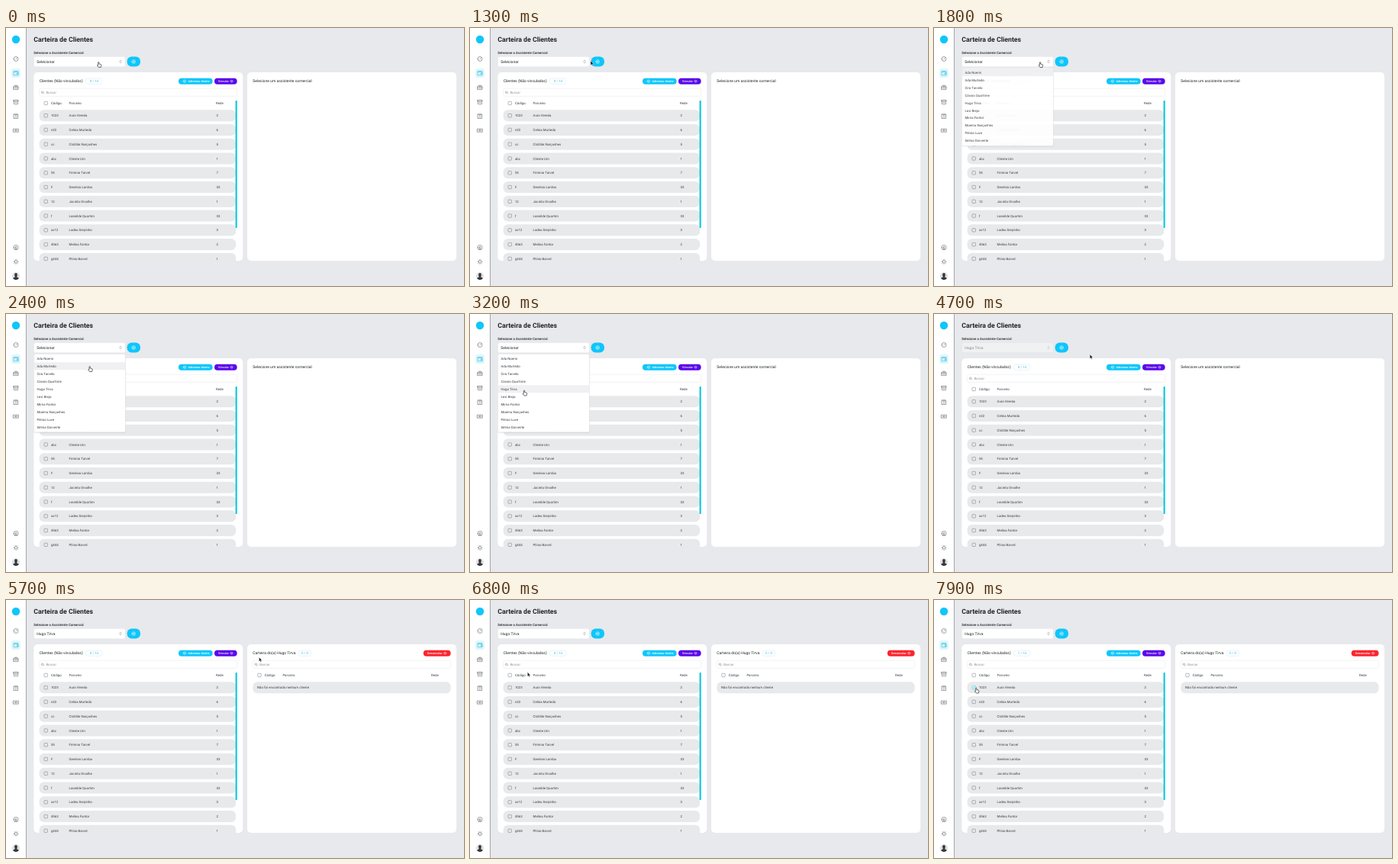
Write an HTML page that moves like this. It is 600 px wide and 338 px high and loops after 8 s.

```html
<!DOCTYPE html>
<html lang="pt">
<head>
<meta charset="utf-8">
<style>
  html, body { margin: 0; width: 100%; height: 100%; overflow: hidden; background: #e8e9ec; }
  svg { display: block; width: 600px; height: 338px; }
  text { font-family: Roboto, Arial, sans-serif; text-rendering: geometricPrecision; white-space: pre; }
</style>
</head>
<body>
<svg id="stage" viewBox="0 0 600 338" xmlns="http://www.w3.org/2000/svg">
  <clipPath id="panelClip"><rect x="36.2" y="58" width="274.3" height="247" rx="5"/></clipPath>
</svg>
<script>
const CYAN = '#0fc6fa', TEAL = '#14c8dc', PURPLE = '#5a08ea', RED = '#fb2530';
const DARK = '#222327', BODY = '#3b3c41', MUTED = '#8e9095', ROW = '#e8e9eb', LINE = '#dfe1e4';
const SMALL = 3.75, MEDIUM = 4.375, LARGE = 5;
const LOOP = 8000, STEP = 100;

const clients = [
  ['1023', 'Auro Vereda', 2], ['n32', 'Celina Murtedo', 6], ['cc', 'Clotilde Narçanhes', 5],
  ['abc', 'Cliente Um', 1], ['55', 'Firmino Tarvel', 7], ['F', 'Genésio Lomba', 33],
  ['12', 'Jacinta Orvalhe', 1], ['f', 'Leonilde Quartim', 33], ['xx12', 'Ladeu Serpinho', 3],
  ['4563', 'Melina Fontor', 2], ['g444', 'Plínio Barvel', 1]
];
const assistants = ['Ada Noemi', 'Ada Murtedo', 'Ciro Tarvelo', 'Cássio Quartime', 'Hugo Tirva',
  'Levi Brejo', 'Mirna Fontor', 'Moema Narçanhes', 'Pérsio Luve', 'Selma Dorvente'];
const chosen = 4;

const stage = document.getElementById('stage');

function el(parent, tag, attrs = {}) {
  const node = document.createElementNS('http://www.w3.org/2000/svg', tag);
  for (const key in attrs) node.setAttribute(key, attrs[key]);
  return parent.appendChild(node);
}
const group = (parent, attrs) => el(parent, 'g', attrs);
const box = (parent, x, y, width, height, fill, rx = 0, stroke = 'none') =>
  el(parent, 'rect', { x, y, width, height, fill, rx, stroke, 'stroke-width': .4 });
const icon = (parent, x, y, d, stroke = '#55575d', width = .55) =>
  el(parent, 'path', { d, fill: 'none', stroke, 'stroke-width': width, 'stroke-linejoin': 'round',
    'stroke-linecap': 'round', transform: `translate(${x} ${y})` });
// The label is centred vertically on y.
function label(parent, x, y, content, size = MEDIUM, fill = BODY, weight = 400) {
  const node = el(parent, 'text', { x, y: y + size * .355, 'font-size': size, fill, 'font-weight': weight });
  node.textContent = content;
  return node;
}
const ring = r => `M${-r} 0a${r} ${r} 0 1 0 ${2 * r} 0a${r} ${r} 0 1 0 ${-2 * r} 0`;
const plus = ring(1.9) + 'M-.9 0H.9M0-.9V.9';
const arrowRing = ring(1.6) + 'M-.7 0H.7M.1-.6L.7 0 .1.6';
const checkbox = (parent, x, y) => box(parent, x - 2.2, y - 2.2, 4.4, 4.4, 'none', .7, '#55575d');

function badge(parent, x, width, content) {
  box(parent, x, 66.1, width, 7.2, '#fff', 2, '#bfe9f0');
  const node = label(parent, x + width / 2, 69.7, content, MEDIUM, '#3fbfd2');
  node.setAttribute('text-anchor', 'middle');
  return node;
}
function button(parent, x, width, fill, caption, textX, iconX, d) {
  box(parent, x, 65.8, width, 7.9, fill, 3.9);
  label(parent, textX, 69.7, caption, SMALL, '#fff', 500);
  icon(parent, iconX, 69.7, d, '#fff', .4);
}
function tableHead(parent, x, networkX) {
  box(parent, x, 79.2, 259.2, 10.2, '#fff', 2.5, LINE);
  icon(parent, x + 4.1, 84.2, ring(1.3) + 'M1 1L1.9 1.9', '#777a80', .5);
  label(parent, x + 8.8, 84.3, 'Buscar', MEDIUM, MUTED);
  checkbox(parent, x + 8.6, 98.5);
  label(parent, x + 15.3, 98.4, 'Código');
  label(parent, x + 39, 98.4, 'Parceiro');
  label(parent, networkX, 98.4, 'Rede');
}

// Sidebar
box(stage, 0, 0, 26, 338, '#fff');
box(stage, 26, 0, 1, 338, '#a3a5a9');
el(stage, 'circle', { cx: 13, cy: 15, r: 5.2, fill: CYAN });
box(stage, 7.2, 53.2, 11.6, 11.8, '#dcf5fb', 2.2);
icon(stage, 13, 40.5, ring(3) + 'M-.4.5L1.5-1.4');
icon(stage, 13, 59.2, 'M2.5-1.7V-2.6H-2.6Q-3.2-2.2-3-1.6V2.6H3V-1.6H-2.7M3-.2H1.2V1.1H3', '#17b7d2');
icon(stage, 13, 78, 'M-3-1.6H3V2.6H-3ZM-1.3-1.6V-2.8H1.3V-1.6M-3 .3H3M0 0V.8');
icon(stage, 13, 97, 'M-3-2.6H3V-1H-3ZM-2.6-1V2.7H2.6V-1M-.9.5H.9');
icon(stage, 13, 115.6, 'M-2.6-2.7H2.6V2.9H-2.6ZM-1.1-2.7V-1.2H1.1V-2.7M-1.1 1H1.1');
icon(stage, 13, 134.2, 'M-3.3-2H3.3V2H-3.3ZM-2.2 0H-1.9M1.9 0H2.2' + ring(.9));
icon(stage, 13, 287.5, ring(3.1) + ring(1) + 'M-1.8 2.4Q0 .4 1.8 2.4');
icon(stage, 13, 306.2, ring(1.8) + 'M0-3.1V-2.6M0 2.6V3.1M-3.1 0H-2.6M2.6 0H3.1M-2.2-2.2L-1.9-1.9M1.9 1.9L2.2 2.2M-2.2 2.2L-1.9 1.9M1.9-1.9L2.2-2.2');
el(stage, 'circle', { cx: 13, cy: 325, r: 5, fill: '#dfe0e2' });
el(stage, 'path', { d: 'M9 328Q9.8 326.6 11.8 326.5L11.6 325.6Q10.3 321.2 13 321.1 15.7 321.2 14.4 325.6L14.2 326.5Q16.2 326.6 17 328 13 332 9 328Z', fill: '#34363b' });

// Header
label(stage, 36.3, 15.2, 'Carteira de Clientes', 8.75, DARK, 700);
label(stage, 36.3, 32.1, 'Selecione o Assistente Comercial', MEDIUM, DARK, 500);
const selectBox = box(stage, 36.4, 37.6, 120, 13.2, '#fff', 2.5, LINE);
const selectValue = group(stage);
const selectText = label(selectValue, 40.3, 44, 'Selecionar', LARGE, DARK);
icon(selectValue, 150, 44, 'M-.9-.7L0-1.7.9-.7M-.9.7L0 1.7.9.7', '#55575d', .5);
box(stage, 158.6, 37.6, 17.4, 13, CYAN, 6);
icon(stage, 167.2, 44.1, ring(2.3) + 'M-1.1 0H1.1M0-1.1V1.1', '#fff', .55);

// Left panel
const left = group(stage, { 'clip-path': 'url(#panelClip)' });
box(left, 36.2, 58, 274.3, 247, '#fff', 5);
label(left, 43.7, 69.7, 'Clientes (Não vinculados)', LARGE, DARK);
const counter = badge(left, 104.8, 21.2, '0 / 14');
button(left, 226, 44.6, CYAN, 'Adicionar cliente', 238.4, 234, plus);
button(left, 273, 29.7, PURPLE, 'Vincular', 278.1, 295.6, arrowRing);
tableHead(left, 43.6, 275.1);
let firstCheck;
clients.forEach(([code, name, network], i) => {
  const y = 114.7 + i * 18.76;
  box(left, 43.6, y - 7.5, 257.6, 15, ROW, 6);
  const check = checkbox(left, 52.2, y);
  firstCheck ??= check;
  label(left, 58.9, y, code);
  label(left, 82.6, y, name);
  label(left, 275.6, y, network);
});
const tick = icon(left, 52.2, 114.7, 'M-1.1 0L-.3.8 1.2-.8', TEAL, .55);
box(left, 300.6, 95, 2.2, 167, TEAL, .8);

// Right panel
box(stage, 316.1, 58, 274, 247, '#fff', 5);
const rightEmpty = group(stage), rightFull = group(stage);
label(rightEmpty, 323.3, 69.5, 'Selecione um assistente comercial', LARGE, DARK);
label(rightFull, 323.3, 69.7, 'Carteira do(a) ' + assistants[chosen], LARGE, DARK);
badge(rightFull, 383.5, 16, '0 / 0');
button(rightFull, 546.8, 35.8, RED, 'Desvincular', 552, 575.2, arrowRing);
tableHead(rightFull, 323.4, 557);
box(rightFull, 323.4, 107.2, 259.2, 15, ROW, 6);
label(rightFull, 329, 114.6, 'Não foi encontrado nenhum cliente');

// Dropdown
const menu = group(stage);
box(menu, 36.2, 53.2, 121, 103, '#000', 2.5).setAttribute('opacity', .06);
box(menu, 36.6, 52.4, 119.8, 102.4, '#fff', 2, '#dcdde0');
const highlight = box(menu, 36.8, 53, 119.4, 10, '#f0f0f2');
assistants.forEach((name, i) => label(menu, 40.5, 58.2 + i * 10, name));

// Pointer
const arrow = el(stage, 'path', { d: 'M0 0V5.6L1.3 4.5 2.1 6.4 3 6 2.2 4.2H3.9Z',
  fill: '#111', stroke: '#fff', 'stroke-width': .4 });
const hand = el(stage, 'path', { d: 'M-.6.4Q0-.4.6.4V2.5L3 3.1Q3.7 3.4 3.6 4.2L3 7H0L-2 4.5Q-1.8 3.6-.6 4.4Z',
  fill: '#fff', stroke: '#111', 'stroke-width': .6 });

const route = [
  [0, 121.3, 44.5], [100, 121.3, 44.5], [900, 167, 42], [1100, 167, 42], [1300, 158, 43],
  [1600, 139, 44.6], [1900, 139, 44.6], [3000, 71, 100], [3300, 71, 100], [3500, 76, 98],
  [3600, 76, 98], [4200, 135, 71.5], [4500, 180, 50], [5400, 372, 73], [5600, 372, 73],
  [5700, 331.5, 75], [5800, 230, 71], [6100, 230, 71], [7000, 53, 98], [7500, 55.3, 115], [LOOP, 55.3, 115]
];
const clamp = v => Math.max(0, Math.min(1, v));
const show = (node, visible) => node.setAttribute('visibility', visible ? 'visible' : 'hidden');
const inside = (x, y, x0, y0, x1, y1) => x > x0 && x < x1 && y > y0 && y < y1;

function pointerAt(t) {
  const next = route.findIndex(point => point[0] > t);
  const [t0, x0, y0] = route[next - 1], [t1, x1, y1] = route[next];
  const p = (t - t0) / (t1 - t0), e = p * p * (3 - 2 * p);
  return [x0 + (x1 - x0) * e, y0 + (y1 - y0) * e];
}

function render(t) {
  const [x, y] = pointerAt(t);
  const picked = t >= 3400, loaded = t >= 4900, busy = picked && !loaded, checked = t >= 7700;

  selectText.textContent = picked ? assistants[chosen] : 'Selecionar';
  selectBox.setAttribute('fill', busy ? '#f0f1f3' : '#fff');
  selectValue.setAttribute('opacity', busy ? .5 : 1);

  const opening = clamp((t - 1610) / 200), closing = clamp((t - 3300) / 200);
  menu.setAttribute('opacity', opening * (1 - closing));
  menu.setAttribute('transform', `translate(0 ${52 * (1 - opening) * .08}) scale(1 ${1 - (1 - opening) * .08})`);
  highlight.setAttribute('y', 53.2 + 10 * Math.max(0, Math.floor((y - 53) / 10)));

  show(rightEmpty, !loaded);
  show(rightFull, loaded);
  counter.textContent = checked ? '1 / 14' : '0 / 14';
  firstCheck.setAttribute('stroke', checked ? TEAL : '#55575d');
  firstCheck.setAttribute('fill', checked ? '#dcf5fb' : 'none');
  show(tick, checked);

  const clickable = !busy && inside(x, y, 36, 37, 156.5, 51) || inside(x, y, 158.6, 37, 176, 51) ||
    t > 1600 && t < 3500 && inside(x, y, 36, 51, 156.5, 155) ||
    inside(x, y, 226, 65, 270.6, 74) || inside(x, y, 49, 96, 56, 101) || inside(x, y, 49, 111, 56, 118);
  show(hand, clickable);
  show(arrow, !clickable);
  for (const node of [hand, arrow]) node.setAttribute('transform', `translate(${x} ${y})`);
}

function tickFrame() {
  render(Math.floor(performance.now() % LOOP / STEP) * STEP);
  requestAnimationFrame(tickFrame);
}
tickFrame();
</script>
</body>
</html>
```
